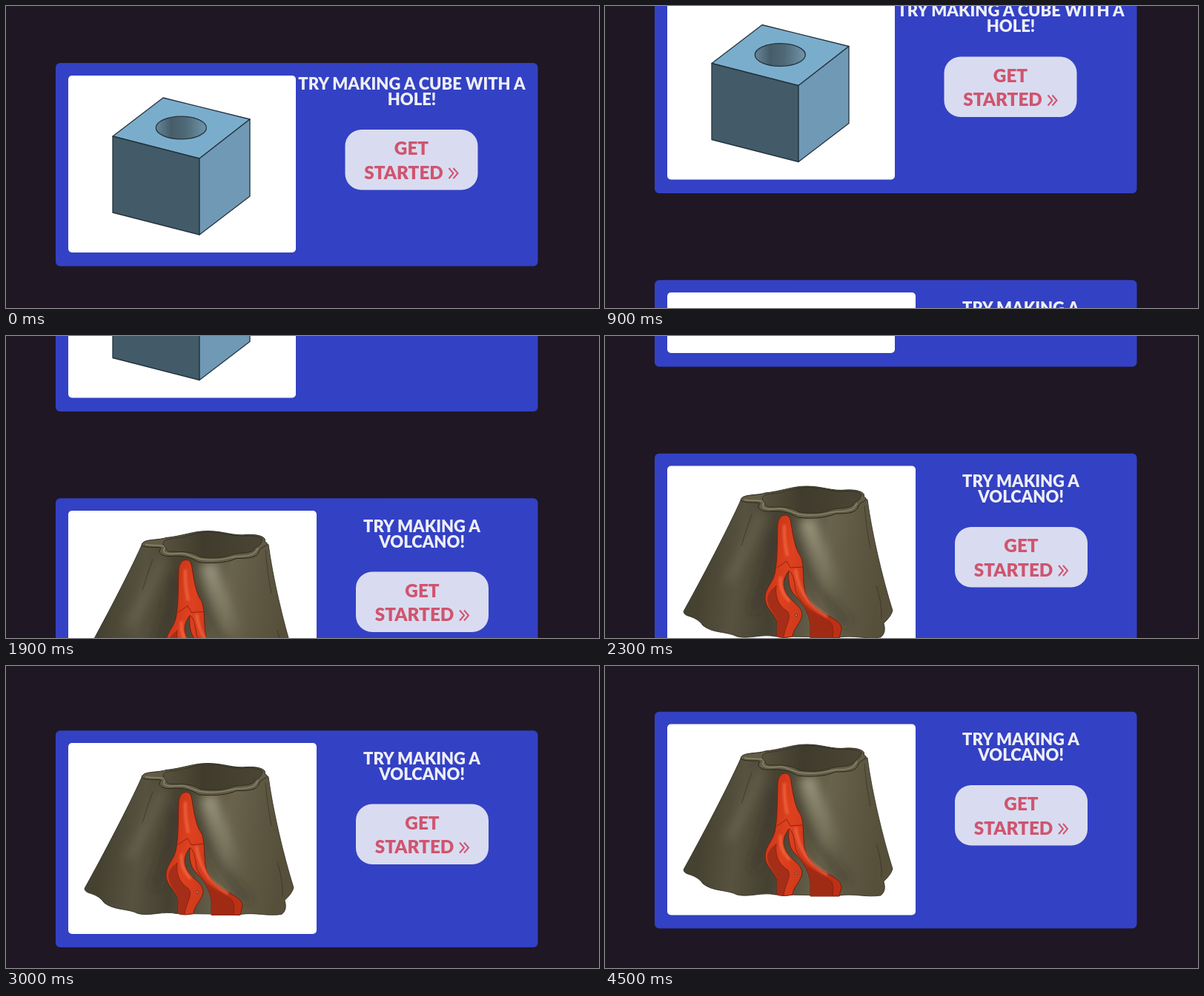
An HTML page that plays this animation: 800 by 408 pixels, repeating every 4600 ms.

```html
<!DOCTYPE html>
<html lang="en">
<head>
<meta charset="utf-8">
<title>Project cards</title>
<style>
  html, body { margin: 0; width: 100%; height: 100%; overflow: hidden; background: #1f1724; }
  svg { display: block; width: 800px; height: 408px; }
  text { font-family: Lato, "Open Sans", sans-serif; text-anchor: middle; }
  .title { font-size: 22px; font-weight: 900; fill: #eeeef6; }
  .label { font-size: 24.3px; font-weight: 900; fill: #d0546e; }
  .card { fill: #3341c4; }
  .photo { fill: #fff; }
  .edge { stroke: #24333d; stroke-width: 1.3; stroke-linejoin: round; }
  .line { fill: none; stroke: #302c20; stroke-width: 1; }
  .crease { fill: none; stroke: #8d2310; stroke-width: 1; }
</style>
</head>
<body>
<svg viewBox="0 0 800 408">
  <defs>
    <linearGradient id="hole">
      <stop offset="0" stop-color="#668799"/>
      <stop offset=".3" stop-color="#465d69"/>
      <stop offset=".6" stop-color="#506a78"/>
      <stop offset="1" stop-color="#7095ab"/>
    </linearGradient>
    <linearGradient id="rock" gradientUnits="userSpaceOnUse" x1="135" y1="185" x2="375" y2="215">
      <stop offset="0" stop-color="#464231"/>
      <stop offset=".2" stop-color="#575240"/>
      <stop offset=".4" stop-color="#454131"/>
      <stop offset=".52" stop-color="#534e3b"/>
      <stop offset=".68" stop-color="#69634d"/>
      <stop offset=".84" stop-color="#5e5843"/>
      <stop offset="1" stop-color="#564f3a"/>
    </linearGradient>
    <linearGradient id="crater">
      <stop offset="0" stop-color="#57523e"/>
      <stop offset=".4" stop-color="#403c2d"/>
      <stop offset="1" stop-color="#4a4534"/>
    </linearGradient>
    <linearGradient id="shine" gradientUnits="userSpaceOnUse" x1="270" y1="150" x2="310" y2="250">
      <stop offset="0" stop-color="#b5b096"/>
      <stop offset="1" stop-color="#b5b096" stop-opacity="0"/>
    </linearGradient>
    <linearGradient id="lava" x1="0" y1="0" x2="1" y2=".35">
      <stop offset="0" stop-color="#bd3015"/>
      <stop offset=".4" stop-color="#de411f"/>
      <stop offset="1" stop-color="#bd3015"/>
    </linearGradient>
    <filter id="soft" x="-60%" y="-30%" width="220%" height="160%">
      <feGaussianBlur stdDeviation="7"/>
    </filter>
    <filter id="glint" x="-100%" y="-30%" width="300%" height="160%">
      <feGaussianBlur stdDeviation="1.5"/>
    </filter>
    <clipPath id="slope">
      <path id="cone" d="M183 125C166 163 132 228 106 275Q106 280 115 282Q127 286 132 294C145 305 165 302 178 309C195 313 212 305 230 309L316 310C337 307 352 313 372 310Q380 304 376 291Q386 282 388 274C374 229 360 169 354 124L270 110Z"/>
    </clipPath>
    <g id="button">
      <rect width="179" height="81.5" rx="22" fill="#d9dcf0"/>
      <text class="label" x="89.5" y="34">GET</text>
      <text class="label" x="79" y="66.5">STARTED</text>
      <path d="M140 52l6 7-6 7M146 52l6 7-6 7" fill="none" stroke="#d0546e" stroke-width="2"/>
    </g>
  </defs>

  <g id="page">
    <rect class="card" x="67" y="77" width="650.5" height="274.5" rx="6"/>
    <rect class="photo" x="84" y="94" width="307" height="239" rx="5"/>
    <g class="edge">
      <path d="M144 176L212 124 329 153 261 206Z" fill="#7aadcc"/>
      <path d="M144 176L261 206V309L144 279Z" fill="#435b68"/>
      <path d="M261 206L329 153V257L261 309Z" fill="#7099b6"/>
      <ellipse cx="236.3" cy="164.5" rx="34" ry="15.3" fill="url(#hole)"/>
    </g>
    <text class="title" x="547.5" y="112.5">TRY MAKING A CUBE WITH A</text>
    <text class="title" x="547.5" y="133.5">HOLE!</text>
    <use href="#button" x="457.5" y="167"/>

    <g transform="translate(0 407)">
      <rect class="card" x="67" y="61.7" width="650.5" height="292.8" rx="6"/>
      <rect class="photo" x="84" y="78.5" width="335" height="258" rx="5"/>
      <use href="#cone" fill="url(#rock)" stroke="#2d291e" stroke-width=".8"/>
      <g clip-path="url(#slope)" fill="none" filter="url(#soft)">
        <path d="M212 142Q196 185 165 235" stroke="#77715a" stroke-width="12" opacity=".5"/>
        <path d="M272 150Q284 192 312 252" stroke="url(#shine)" stroke-width="22" opacity=".75"/>
        <path d="M228 165Q222 215 200 275M260 175Q277 240 328 292" stroke="#322e22" stroke-width="9" opacity=".5"/>
      </g>
      <path d="M183 125C184 116 204 119 216 115C238 113 252 106 272 106C294 106 306 113 325 111C342 110 352 115 349 120C358 124 345 127 342 132C340 143 325 143 311 143C296 150 272 150 260 148C247 140 236 139 223 140C213 141 204 136 208 131C214 125 191 131 183 125Z"
            fill="#625c46" stroke="#28251b"/>
      <path d="M188 124C196 127 219 122 213 131C211 138 225 137 238 136C250 138 258 146 276 145C294 146 304 140 318 140C336 139 337 134 340 129" fill="none" stroke="#8a846b" stroke-width="1.5"/>
      <path d="M214 127C209 120 215 117 225 116C242 114 254 107.500 273 107.500C292 107.500 307 114 325 112.500C340 112 350 116 345 120C344 126 336 127 335 131C328 138 313 134 302 139C288 144 270 142 262 141C249 133 238 134 225 134C214 134 219 131 214 127Z"
            fill="url(#crater)" stroke="#29261b" stroke-width=".8"/>
      <path class="line" d="M198 144Q190 166 184 186M350 132Q353 165 358 190M366 240Q374 264 373 286" opacity=".6"/>

      <path d="M233 157C234 149 238 145 243 145C248 145 250 149 251 156C254 174 256 190 264 201C269 212 266 230 270 249C276 266 287 274 301 281C313 287 319 292 319 299L316 311H277V292C275 276 266 263 255 252C248 245 247 231 248 220C240 231 239 240 244 250C251 263 264 266 266 278C266 290 254 297 253 309Q240 312 232 309V290C229 278 216 270 216 258C215 245 226 237 229 224C233 207 232 180 233 157Z"
            fill="url(#lava)" stroke="#70200f"/>
      <path d="M232 288C229 277 219 271 219 257C220 249 226 244 231 240C229 257 235 268 246 275C253 283 243 294 241 310L232 309Z" fill="#a52e18"/>
      <path d="M277 311V291C275 278 270 269 264 261C277 279 296 283 306 292Q309 300 307 311Z" fill="#9f2b15"/>
      <path d="M242 158Q241 178 246 200M257 218Q260 242 274 261Q284 272 300 282M237 228Q234 246 249 262" fill="none" stroke="#ff7650" stroke-width="4" opacity=".6" filter="url(#glint)"/>
      <path class="crease" d="M232 216L245 207 250 216 267 215M231 240C229 257 235 268 246 275C253 283 243 294 241 310M248 220Q255 223 257 247C270 278 297 281 306 292Q309 300 307 311"/>
      <circle cx="258" cy="280" r="1.5" fill="#b9a69b" stroke="#4a2a22" stroke-width=".8"/>

      <text class="title" x="561" y="107">TRY MAKING A</text>
      <text class="title" x="561" y="128">VOLCANO!</text>
      <use href="#button" x="472" y="161"/>
    </g>
  </g>
</svg>
<script>
  const LOOP = 4600, STEP = 100;
  const page = document.getElementById('page');
  // [step, scroll offset, speed in px per step]
  const keys = [[0, 0, 8], [5, 55, 11], [13, 148, 14], [19, 249.5, 16.5],
                [23, 310, 13], [30, 381.5, 8], [36, 407, 0]];

  // Cubic Hermite curve through the keys
  function scrollAt(step) {
    const i = keys.findIndex(k => k[0] > step);
    if (i < 0) return keys[keys.length - 1][1];
    const [t0, y0, v0] = keys[i - 1], [t1, y1, v1] = keys[i];
    const d = t1 - t0, u = (step - t0) / d, w = 1 - u;
    return w * w * ((1 + 2 * u) * y0 + u * d * v0) +
           u * u * ((3 - 2 * u) * y1 - w * d * v1);
  }

  function draw() {
    const step = Math.floor(performance.now() % LOOP / STEP);
    page.setAttribute('transform', `translate(0 ${-scrollAt(step)})`);
    requestAnimationFrame(draw);
  }
  draw();
</script>
</body>
</html>
```
